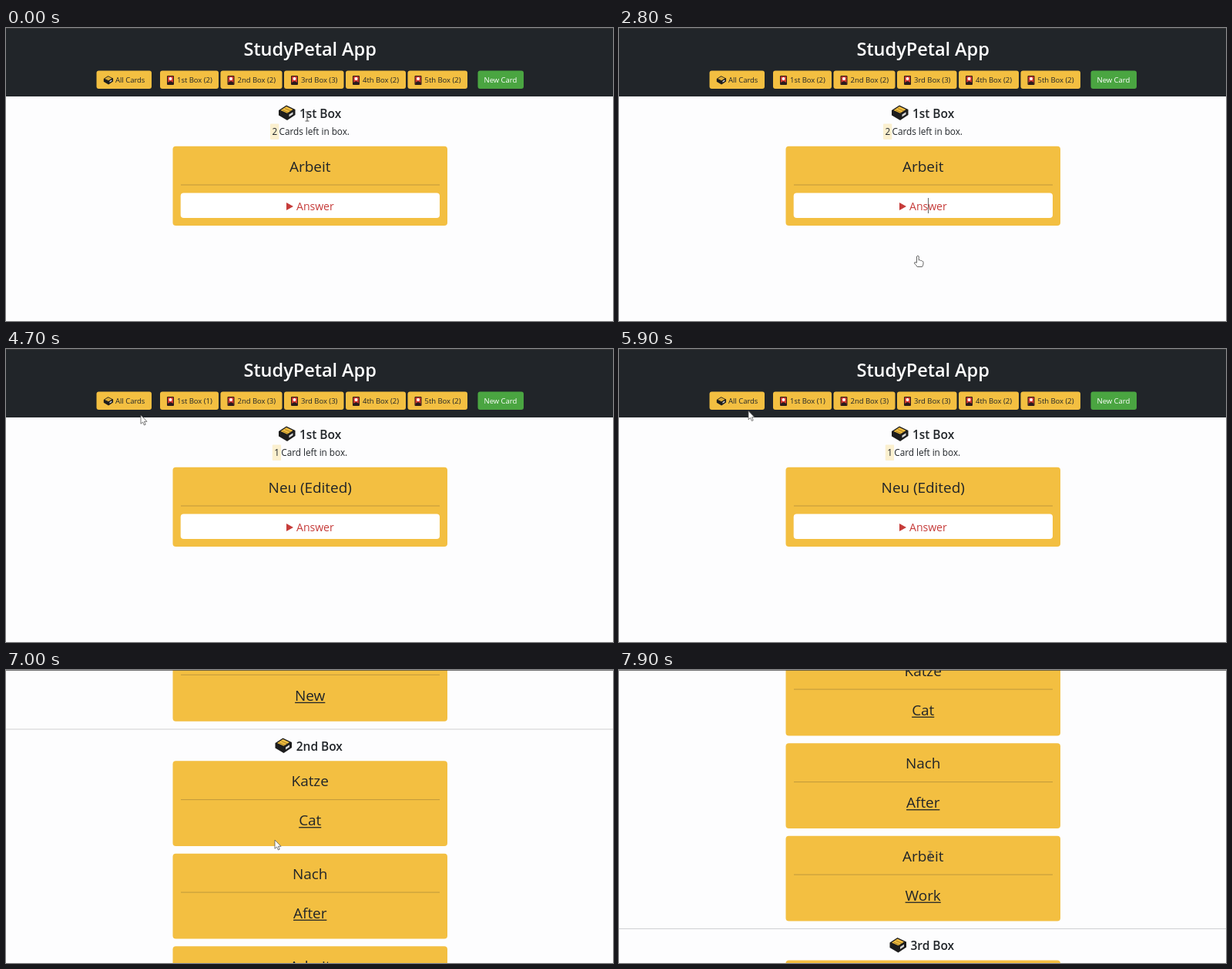
Animation, 788 px wide and 381 px high, one loop 8 s. Source, as an HTML page:

```html
<!DOCTYPE html>
<html lang="en">
<head>
<meta charset="utf-8">
<title>StudyPetal App</title>
<style>
  html, body { margin: 0; width: 100%; height: 100%; overflow: hidden; background: #fdfdfe; }
  svg { display: block; width: 788px; height: 381px; }
  text { font-family: "Open Sans", "Noto Sans", sans-serif; fill: #212529; letter-spacing: -.003em; white-space: pre; }
  .title { font-size: 23.6px; font-weight: 600; fill: #fff; }
  .head { font-size: 15.5px; font-weight: 600; }
  .word { font-size: 19px; text-anchor: middle; }
  .btn { font-size: 9.5px; }
  .note { font-size: 11.8px; }
  .reveal { font-size: 14.1px; fill: #c63c3a; }
  .url { font-size: 6.9px; fill: #fff; }
</style>
</head>
<body>
<svg id="stage" viewBox="0 0 788 381" xmlns="http://www.w3.org/2000/svg"></svg>
<script>
const YELLOW = '#f3bf41', DARK = '#212529', LOOP = 8000, STEP = 100;
const MID = 394.7;

const rect = (x, y, w, h, fill, r = 0, extra = '') =>
  `<rect x="${x}" y="${y}" width="${w}" height="${h}" rx="${r}" fill="${fill}" ${extra}/>`;
const text = (x, y, cls, s, extra = '') => `<text x="${x}" y="${y}" class="${cls}" ${extra}>${s}</text>`;
const line = (x1, x2, y, color) => rect(x1, y - .5, x2 - x1, 1, color);
const group = (id, body) => `<g id="${id}">${body}</g>`;

// Card file box, 22 by 20 units
const boxIcon = (x, y, k = 1) => `<g transform="translate(${x} ${y}) scale(${k})">
  <path d="M0 7L10 .5L21.5 6V13L11 20L0 13.5Z" fill="#1d1d1d"/>
  <path d="M2.5 7L10 2L18.5 6L11 10.8Z" fill="${YELLOW}"/>
  <path d="M5 6.6L13 10M8 4.6L16 8" stroke="#93701f" stroke-width=".8"/>
  <path d="M13.5 12.4L18.5 9.2V12.2L13.5 15.4Z" fill="#d8d8d8"/></g>`;

const tileIcon = x => rect(x, 62, 9, 12, '#2b1c1c', 1) + rect(x + 1, 63, 7, 10, '#d63a2f')
  + `<circle cx="${x + 4.5}" cy="66" r="2" fill="#fff"/>`
  + `<path d="M${x + 1} 73V71Q${x + 4.5} 67.5 ${x + 8} 71V73Z" fill="#2b1c1c"/>`;

const word = (y, s, line) => text(MID, y, 'word', s)
  + (line ? `<rect class="under" data-y="${y}" x="${MID}" y="${y + 2}" width="0" height="1.3" fill="${DARK}"/>` : '');

function header() {
  const tabs = [[200, 276], [278.5, 358.5], [361, 438.5], [441, 519], [521.5, 599]];
  const names = ['1st', '2nd', '3rd', '4th', '5th'];
  return rect(0, 0, 788, 89, DARK)
    + text(MID, 35.5, 'title', 'StudyPetal App', 'text-anchor="middle"')
    + rect(117.5, 55.5, 71.5, 23.5, YELLOW, 3) + boxIcon(126.8, 62, .57) + text(142, 71.3, 'btn', 'All Cards')
    + tabs.map(([a, b], i) => rect(a, 55.5, b - a, 23.5, YELLOW, 3) + tileIcon(a + 9)
      + `<text x="${a + 22}" y="71.3" class="btn">${names[i]} Box (<tspan class="count"></tspan>)</text>`).join('')
    + rect(612.5, 55.5, 59.5, 23.5, '#4aa541', 3) + text(620.5, 71.3, 'btn', 'New Card', 'style="fill:#fff"');
}

const study = () => rect(352.5, 98, 84.5, 23.5, '#578bee', 0, 'id="selAll"')
  + rect(381, 98, 24, 23.5, '#578bee', 0, 'id="selWord"')
  + boxIcon(354, 100)
  + '<text x="381" y="116.6" class="head" id="studyHead"><tspan id="first">1st</tspan> Box</text>'
  + group('note', rect(343, 124.5, 11.3, 20.5, '#fbf0cf', 1) + text(345.4, 139.3, 'note', '', 'id="left"')
    + text(354.5, 139.3, 'note', '', 'id="leftText"'))
  + rect(216.5, 153.7, 356.5, 103.3, YELLOW, 4, 'id="card"')
  + text(MID, 187, 'word', '', 'id="question"')
  + line(227, 563, 204, 'rgba(33,37,41,.25)')
  + rect(226.7, 214.5, 336.3, 32.5, '#fff', 4, 'id="answerBox"')
  + '<path id="marker" fill="#c63c3a"/>' + text(377, 236.8, 'reveal', 'Answer')
  + group('answer', word(281, 'Work', true))
  + rect(401, 221, 1, 20, '#666', 0, 'id="caret"');

const card = (y, q, a) => rect(216.5, y, 356.5, 110.7, YELLOW, 4)
  + word(y + 33, q) + line(227, 563, y + 50.3, 'rgba(33,37,41,.25)') + word(y + 83.8, a, true);

const heading = (y, iconX, textX, s) => boxIcon(iconX, y) + text(textX, y + 16.6, 'head', s);

const list = () => heading(100, 354, 381, '1st Box') + card(130, 'Neu (Edited)', 'New')
  + line(0, 788, 251, '#cfd0d2')
  + heading(262, 349.5, 376.8, '2nd Box') + card(292.3, 'Katze', 'Cat')
  + card(412.8, 'Nach', 'After') + card(533.3, 'Arbeit', 'Work')
  + line(0, 788, 654, '#cfd0d2')
  + heading(665, 351.5, 378.5, '3rd Box') + rect(216.5, 695, 356.5, 110.7, YELLOW, 4);

const pointers = `
  <path class="ptr" d="M0 0V11.3L2.6 9L4.4 13L6.2 12.2L4.5 8.3H8Z" fill="#fff" stroke="#555" stroke-width=".8"/>
  <path class="ptr" d="M-1.5 1Q0 -.9 1.2 1V6Q3 5 3.6 6.6Q5 6 5.5 7.2Q7 7 7 8.6V11Q6.6 13 5.6 14.5H-.8Q-2 12.4 -4.6 10Q-5 7.6 -1.5 9.2Z" fill="#fff" stroke="#555" stroke-width=".9"/>
  <path class="ptr" d="M-2.5 -6H2.5M0 -6V6M-2.5 6H2.5" fill="none" stroke="#555" stroke-width="1"/>`;

document.getElementById('stage').innerHTML = rect(0, 0, 788, 381, '#fdfdfe')
  + group('page', header() + group('study', study()) + group('list', list()))
  + rect(0, 0, 788, 1, 'rgba(60,60,60,.7)')
  + group('status', `<path d="M0 367H52.5Q55 367 55 369.5V381H0Z"/>` + text(3, 377, 'url', '127.0.0.1:8000'))
  + group('pointer', pointers);

const $ = id => document.getElementById(id);
const show = (el, on) => el.setAttribute('display', on ? 'inline' : 'none');
const counts = document.querySelectorAll('.count'), kinds = document.querySelectorAll('.ptr');

// Underlines take the width of the word they follow.
document.querySelectorAll('.under').forEach(u => {
  const w = u.previousElementSibling.getComputedTextLength();
  u.setAttribute('x', MID - w / 2);
  u.setAttribute('width', w);
});

const ARROW = 0, HAND = 1, BEAM = 2;
// time, x, y, pointer shape from then on
const path = [
  [0, 391, 115, BEAM], [1000, 391, 115, BEAM], [1100, 421, 142, ARROW], [1200, 447, 169, ARROW],
  [1500, 420, 215, HAND], [1700, 401, 233, HAND], [2000, 401, 233, HAND], [2800, 388, 296, HAND],
  [3500, 388, 296, HAND], [3900, 388, 300, ARROW], [4300, 270, 190, ARROW], [4700, 175, 86, ARROW],
  [5100, 182, 98, ARROW], [5400, 182, 98, ARROW], [5600, 178, 92, ARROW], [5800, 178, 92, ARROW],
  [6000, 158, 69, HAND], [6200, 158, 69, ARROW], [6400, 198, 188, ARROW], [6700, 330, 215, ARROW],
  [7000, 349, 221, ARROW], [7300, 365, 226, ARROW], [7400, 365, 226, ARROW], [7700, 392, 237, BEAM],
  [7900, 404, 242, BEAM]
];
const scroll = [[0, 0], [6700, 0], [6800, 55], [7000, 174], [7300, 248], [7400, 248], [7900, 317.5]];

function at(keys, t, col) {
  const i = keys.findIndex(k => k[0] > t);
  if (i < 0) return keys[keys.length - 1][col];
  const a = keys[i - 1], b = keys[i];
  return a[col] + (b[col] - a[col]) * (t - a[0]) / (b[0] - a[0]);
}

function draw(t) {
  const next = t >= 3900, open = t >= 3000 && !next, all = t >= 6200;
  const selAll = t >= 1000 && t < 2000, selWord = t >= 800 && t < 1000;

  [next ? 1 : 2, next ? 3 : 2, 3, 2, 2].forEach((n, i) => counts[i].textContent = n);
  show($('study'), !all);
  show($('list'), all);
  show($('selAll'), selAll);
  show($('selWord'), selWord);
  $('studyHead').style.fill = selAll ? '#fff' : DARK;
  $('first').style.fill = selAll || selWord ? '#fff' : DARK;

  $('note').setAttribute('transform', `translate(${next ? 2.8 : 0} 0)`);
  $('left').textContent = next ? 1 : 2;
  $('leftText').textContent = next ? 'Card left in box.' : 'Cards left in box.';
  $('question').textContent = next ? 'Neu (Edited)' : 'Arbeit';
  $('card').setAttribute('height', open ? 216 : 103.3);
  $('answerBox').setAttribute('height', open ? 145.5 : 32.5);
  $('marker').setAttribute('d', open ? 'M363 228H373L368 237Z' : 'M364 227L373 232L364 237Z');
  show($('answer'), open);
  show($('caret'), t >= 2000 && !next && Math.floor((t - 1800) / 500) % 2 === 0);
  show($('status'), t >= 6000 && t < 6700);

  $('page').setAttribute('transform', `translate(0 ${-at(scroll, t, 1)})`);
  $('pointer').setAttribute('transform', `translate(${at(path, t, 1)} ${at(path, t, 2)})`);
  const kind = path.filter(k => k[0] <= t).pop()[3];
  kinds.forEach((k, i) => show(k, i === kind));
}

const start = performance.now();
function tick() {
  const t = (performance.now() - start) % LOOP;
  draw(Math.floor(t / STEP) * STEP);
  requestAnimationFrame(tick);
}
tick();
</script>
</body>
</html>
```
